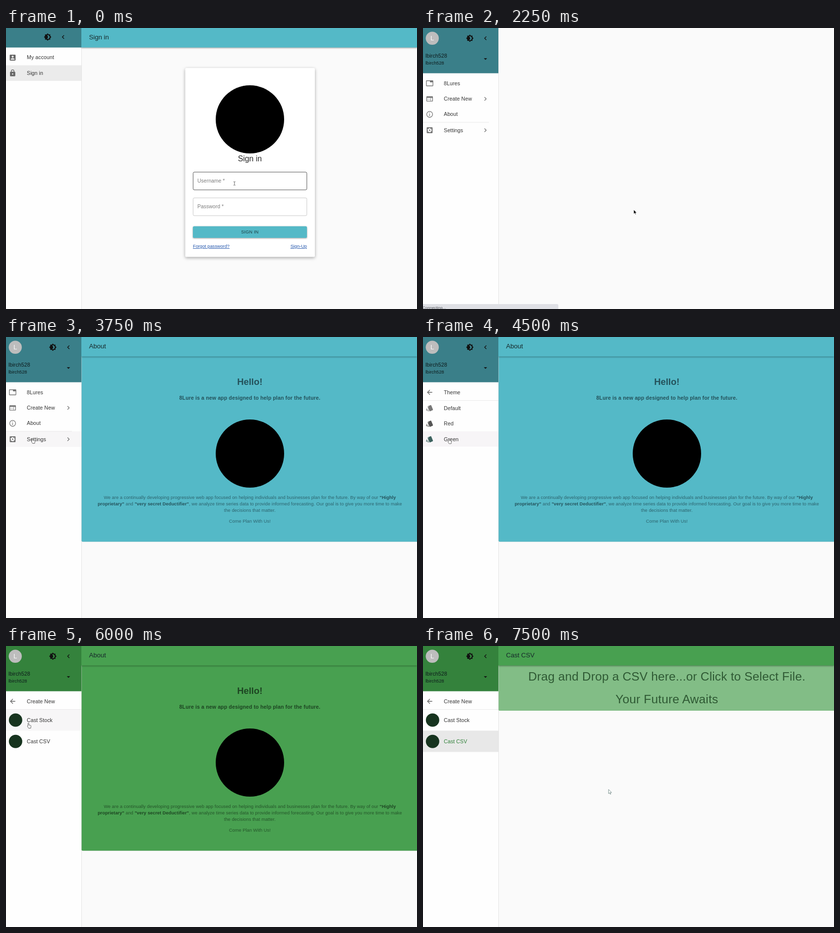
Animation of 829x569 px, one loop 8000 ms. Source, as an HTML page:

```html
<!DOCTYPE html>
<html lang="en">
<head>
<meta charset="utf-8">
<title>Forecast app walkthrough</title>
<style>
html, body { margin: 0; width: 100%; height: 100%; overflow: hidden; background: #fafafa; }
svg { display: block; width: 829px; height: 569px; }
text { font-family: "Liberation Sans", Arial, sans-serif; white-space: pre; }
.scene { visibility: hidden; }
.bar { filter: drop-shadow(0 1.5px 1.5px rgba(0,0,0,.38)); }
.panel { filter: drop-shadow(0 .5px .5px rgba(0,0,0,.25)); }
.card { filter: drop-shadow(0 2px 3px rgba(0,0,0,.34)); }
</style>
</head>
<body>
<svg id="stage" viewBox="0 0 829 569"></svg>
<script>
const USER = 'lbirch528';
const TEAL = { main: '#54b9c7', dark: '#3a7f89', ink: '#24525b', icon: '#757575' };
const GREEN = { main: '#48a050', dark: '#34823c', ink: '#1d4522', icon: '#5f7a62' };

const ICONS = {
  bright: 'M20 8.69V4h-4.69L12 .69 8.69 4H4v4.69L.69 12 4 15.31V20h4.69L12 23.31 15.31 20H20v-4.69L23.31 12zM12 18c-.89 0-1.74-.2-2.5-.55C11.56 16.5 13 14.42 13 12s-1.44-4.5-3.5-5.45C10.26 6.2 11.11 6 12 6c3.31 0 6 2.69 6 6s-2.69 6-6 6z',
  left: 'M15.41 7.41L14 6l-6 6 6 6 1.41-1.41L10.83 12z',
  right: 'M10 6L8.59 7.41 13.17 12l-4.58 4.59L10 18l6-6z',
  down: 'M7 10l5 5 5-5z',
  back: 'M20 11H7.83l5.59-5.59L12 4l-8 8 8 8 1.41-1.41L7.83 13H20z',
  account: 'M3 5v14a2 2 0 0 0 2 2h14a2 2 0 0 0 2-2V5a2 2 0 0 0-2-2H5a2 2 0 0 0-2 2zm12 4a3 3 0 0 1-6 0 3 3 0 0 1 6 0zm-9 8c0-2 4-3.1 6-3.1s6 1.1 6 3.1v1H6z',
  lock: 'M18 8h-1V6A5 5 0 0 0 7 6v2H6a2 2 0 0 0-2 2v10c0 1.1.9 2 2 2h12a2 2 0 0 0 2-2V10a2 2 0 0 0-2-2zm-6 9a2 2 0 0 1 0-4 2 2 0 0 1 0 4zm3.1-9H8.9V6a3.1 3.1 0 0 1 6.2 0z',
  tab: 'M21 3H3a2 2 0 0 0-2 2v14c0 1.1.9 2 2 2h18a2 2 0 0 0 2-2V5a2 2 0 0 0-2-2zm0 16H3V5h10v4h8z',
  web: 'M20 4H4a2 2 0 0 0-2 2v12c0 1.1.9 2 2 2h16a2 2 0 0 0 2-2V6a2 2 0 0 0-2-2zm-5 14H4v-4h11zm0-5H4V9h11zm5 5h-4V9h4z',
  info: 'M11 17h2v-6h-2zM12 2a10 10 0 0 0 0 20 10 10 0 0 0 0-20zm0 18a8 8 0 0 1 0-16 8 8 0 0 1 0 16zM11 9h2V7h-2z',
  cards: 'M2.53 19.65l1.34.56v-9.03l-2.43 5.86c-.4 1 .08 2.2 1.09 2.6zM22 15.95L17.07 4a2 2 0 0 0-2.6-1.1L7.1 5.95a2 2 0 0 0-1.1 2.6L11 20.5a2 2 0 0 0 2.6 1.1l7.36-3.05a2 2 0 0 0 1.04-2.6zM7.88 8.75a1 1 0 0 1 0-2 1 1 0 0 1 0 2zm-2 11c0 1.1.9 2 2 2h1.45l-3.45-8.34z'
};

const rect = (x, y, w, h, fill, extra = '') =>
  `<rect x="${x}" y="${y}" width="${w}" height="${h}" fill="${fill}" ${extra}/>`;
const circle = (x, y, r, fill) => `<circle cx="${x}" cy="${y}" r="${r}" fill="${fill}"/>`;
const text = (x, y, size, str, fill = '#333', extra = '') =>
  `<text x="${x}" y="${y}" font-size="${size}" fill="${fill}" ${extra}>${str}</text>`;
const centered = (y, size, str, fill, extra = '') =>
  text(491.8, y, size, str, fill, `text-anchor="middle" ${extra}`);
const at = (x, y, body, scale = 1) => `<g transform="translate(${x} ${y}) scale(${scale})">${body}</g>`;
const icon = (name, x, y, fill = '#757575') =>
  at(x - 7.92, y - 7.92, `<path d="${ICONS[name]}" fill="${fill}"/>`, .66);
const gear = (x, y, fill) => at(x, y,
  rect(-9, -9, 18, 18, fill, 'rx="2"') +
  '<g fill="none" stroke="#fff"><circle r="3.7" stroke-width="3"/>' +
  '<circle r="5.6" stroke-width="2" stroke-dasharray="3.2 2.66"/></g>', .66);

// Pointers
const arrow = (x, y, fill = '#000', stroke = '#fff') => at(x, y,
  `<path d="M0 0V8.5l2-1.8 1.4 3 1.3-.6-1.3-2.9h2.7z" fill="${fill}" stroke="${stroke}" stroke-width=".7"/>`);
const hand = (x, y) => at(x, y,
  '<path d="M2.2 0c.8 0 1 .6 1 1v3l3.3.7c.8.2 1 .8.9 1.4l-.6 4.4H2.6L.3 6.8c-.5-.8.3-1.4.8-1l.2.3V1c0-.5.3-1 .9-1z" fill="#fff" stroke="#444" stroke-width=".8"/>');
const beam = (x, y) => at(x, y,
  '<path d="M-2-3.5h1.3l.7.5.7-.5H2M0-3v6M-2 3.5h1.3l.7-.5.7.5H2" fill="none" stroke="#444" stroke-width=".8"/>');

// Sidebar
const label = (y, str, fill) => text(42, y + 3.8, 10.56, str, fill, 'letter-spacing=".1"');
const rowFill = (y, h, fill) => rect(0, y, 152, h, fill);
const divider = (y, w = 133) => rect(0, y, w, 1, '#e9e9e9');
const sidebar = rect(0, 0, 152, 569, '#fefefe') + rect(152, 0, 1, 569, '#e5e5e5');

const userPanel = theme => rect(0, 0, 152, 91.6, theme.dark) +
  circle(18.7, 20.8, 13.2, '#bdbdbd') +
  text(18.7, 25.4, 13, 'L', '#fafafa', 'text-anchor="middle"') +
  icon('bright', 94.5, 20.8, '#111') + icon('left', 126, 20.8, '#111') + icon('down', 126, 62.5, '#111') +
  text(5, 59.5, 10.56, USER, '#0d1a1b', 'letter-spacing=".1"') + text(5, 73.7, 9.24, USER, '#0d1a1b');

const rootMenu = (theme, hoverY) => (hoverY ? rowFill(hoverY, 31.5, '#f7f6f7') : '') +
  divider(190.5) +
  icon('tab', 13.4, 112, theme.icon) + label(112, '8Lures') +
  icon('web', 13.4, 143.5, theme.icon) + label(143.3, 'Create New') + icon('right', 125.8, 143.5) +
  icon('info', 13.4, 174.8, theme.icon) + label(174.6, 'About') +
  gear(13.4, 207, theme.icon) + label(206.7, 'Settings') + icon('right', 125.8, 207);

const subMenu = title => icon('back', 13.4, 112, '#666') + label(112, title) + divider(128, 152);

const themeMenu = rowFill(191, 31, '#f7f5f7') + subMenu('Theme') +
  [['Default', '#777'], ['Red', '#555'], ['Green', '#3c625f']].map(([name, tint], i) =>
    icon('cards', 13.4, 144 + i * 31.5, tint) + label(143.8 + i * 31.5, name)).join('');

const createMenu = (stockFill, csvFill, csvInk) =>
  rowFill(129, 42.5, stockFill) + rowFill(171.5, 43, csvFill) + subMenu('Create New') +
  circle(19.3, 150, 13.5, '#17341f') + label(149.7, 'Cast Stock') +
  circle(19.3, 193.3, 13.5, '#17341f') + label(192.8, 'Cast CSV', csvInk);

const statusBar = '<path d="M0 559h270q3 0 3 3v7H0z" fill="#dfe0e5"/>' +
  text(-1, 569, 8, 'Connecting...', '#55585e');

// Pages
const appBar = (theme, title) => `<g class="bar">${rect(152, 0, 677, 39.5, theme.main)}</g>` +
  text(167.5, 22.6, 13.1, title, '#17292b');
const panel = (bottom, fill) => `<g class="panel">${rect(152.5, 30, 680, bottom - 30, fill, 'rx="2"')}</g>`;

const bold = str => `<tspan font-weight="bold" fill-opacity="1">${str}</tspan>`;

function aboutPage(theme) {
  const body = (y, str) => centered(y, 9.24, str, theme.ink, 'letter-spacing=".05" fill-opacity=".82"');
  return panel(414.5, theme.main) + appBar(theme, 'About') +
    centered(96.5, 18.4, 'Hello!', theme.ink, 'font-weight="bold"') +
    centered(127.4, 10.56, '8Lure is a new app designed to help plan for the future.', theme.ink,
      'font-weight="bold" letter-spacing=".13"') +
    circle(492, 236, 69, '#000') +
    body(327.5, `We are a continually developing progressive web app focused on helping individuals and businesses plan for the future. By way of our ${bold('"Highly')}`) +
    body(340.6, `${bold('proprietary"')} and ${bold('"very secret Deductifier"')}, we analyze time series data to provide informed forecasting. Our goal is to give you more time to make`) +
    body(353.6, 'the decisions that matter.') + body(375.7, 'Come Plan With Us!');
}

const csvPage = panel(131, '#82bd86') + appBar(GREEN, 'Cast CSV') +
  centered(70.3, 24.4, 'Drag and Drop a CSV here...or Click to Select File.', '#2f5a34', 'letter-spacing=".2"') +
  centered(116.3, 24.4, 'Your Future Awaits', '#2f5a34', 'letter-spacing=".2"');

function field(y, name, value, border, focused) {
  const box = rect(377.4, y, 229.4, 36, 'none', `rx="2.6" stroke="${border}" stroke-width="${focused ? 1.4 : 1}"`);
  if (!value) return box + text(386, y + 21.4, 10.4, name, '#7c7c7c', 'letter-spacing=".05"');
  return box + rect(383, y - 2, 46, 4, '#fff') +
    text(386, y + 2.6, 7.9, name, focused ? TEAL.dark : '#7c7c7c') +
    text(386, y + 21.6, 10.56, value, '#222');
}

function signIn(user, password, focus) {
  const border = name => focus === name ? TEAL.main : '#c8c8c8';
  return sidebar + appBar(TEAL, 'Sign in') + rect(0, 0, 152, 39.5, TEAL.dark) +
    icon('bright', 84, 18.2, '#111') + icon('left', 115.3, 18.2, '#111') +
    rowFill(75.5, 31.5, '#ebebeb') +
    icon('account', 13.4, 60, '#666') + label(59.6, 'My account') +
    icon('lock', 13.4, 91.2, '#666') + label(91, 'Sign in') +
    `<g class="card">${rect(361.5, 81, 261.5, 382.5, '#fff', 'rx="2.6"')}</g>` +
    circle(492, 185, 69, '#000') + centered(270.3, 15.8, 'Sign in', '#2b2b2b') +
    field(291.8, 'Username *', user, focus ? border('user') : '#555', focus === 'user') +
    field(344, 'Password *', password, border('password'), focus === 'password') +
    `<g class="bar">${rect(377, 401.5, 230, 23.5, TEAL.main, 'rx="2.6"')}</g>` +
    centered(416.3, 9, 'SIGN IN', '#1d3c41', 'letter-spacing=".26"') +
    text(377, 445, 9.24, 'Forgot password?', '#2457ad', 'text-decoration="underline"') +
    text(607, 445, 9.24, 'Sign-Up', '#2457ad', 'text-anchor="end" text-decoration="underline"');
}

const app = (theme, menu, page, pointer) => sidebar + page + userPanel(theme) + menu + pointer;

const SCENES = [
  signIn('', '', '') + beam(460.8, 314.8),
  signIn(USER, '', 'user') + beam(460.8, 314.8),
  signIn(USER, '•'.repeat(10), 'password') + beam(427, 372) + statusBar,
  app(TEAL, rootMenu(TEAL), '', arrow(425, 368) + statusBar),
  app(TEAL, rootMenu(TEAL), aboutPage(TEAL), arrow(425, 368) + statusBar),
  app(TEAL, rootMenu(TEAL, 191), aboutPage(TEAL), hand(51, 205)),
  app(TEAL, themeMenu, aboutPage(TEAL), hand(50, 205.5)),
  app(GREEN, rootMenu(GREEN, 128.5), aboutPage(GREEN), hand(43, 152)),
  app(GREEN, createMenu('#f7f6f7', '#fefefe'), aboutPage(GREEN), hand(43, 156)),
  app(GREEN, createMenu('#fefefe', '#dddddd'), circle(421, 298, 3, '#777'), arrow(40.7, 217.5, '#fff', '#666')),
  app(GREEN, createMenu('#fefefe', '#e8e8e8', '#2f8038'), csvPage, arrow(374.3, 290.5, '#fff', '#4c6a68'))
];

const LOOP = 8000, STEP = 750;
const stage = document.getElementById('stage');
stage.innerHTML = rect(0, 0, 829, 569, '#fafafa') +
  SCENES.map(body => `<g class="scene">${body}</g>`).join('');
const groups = stage.querySelectorAll('.scene');
const start = performance.now();
let shown = -1;

function render() {
  const next = Math.floor((performance.now() - start) % LOOP / STEP);
  if (next !== shown) {
    groups.forEach((group, i) => { group.style.visibility = i === next ? 'visible' : 'hidden'; });
    shown = next;
  }
  requestAnimationFrame(render);
}
render();
</script>
</body>
</html>
```
